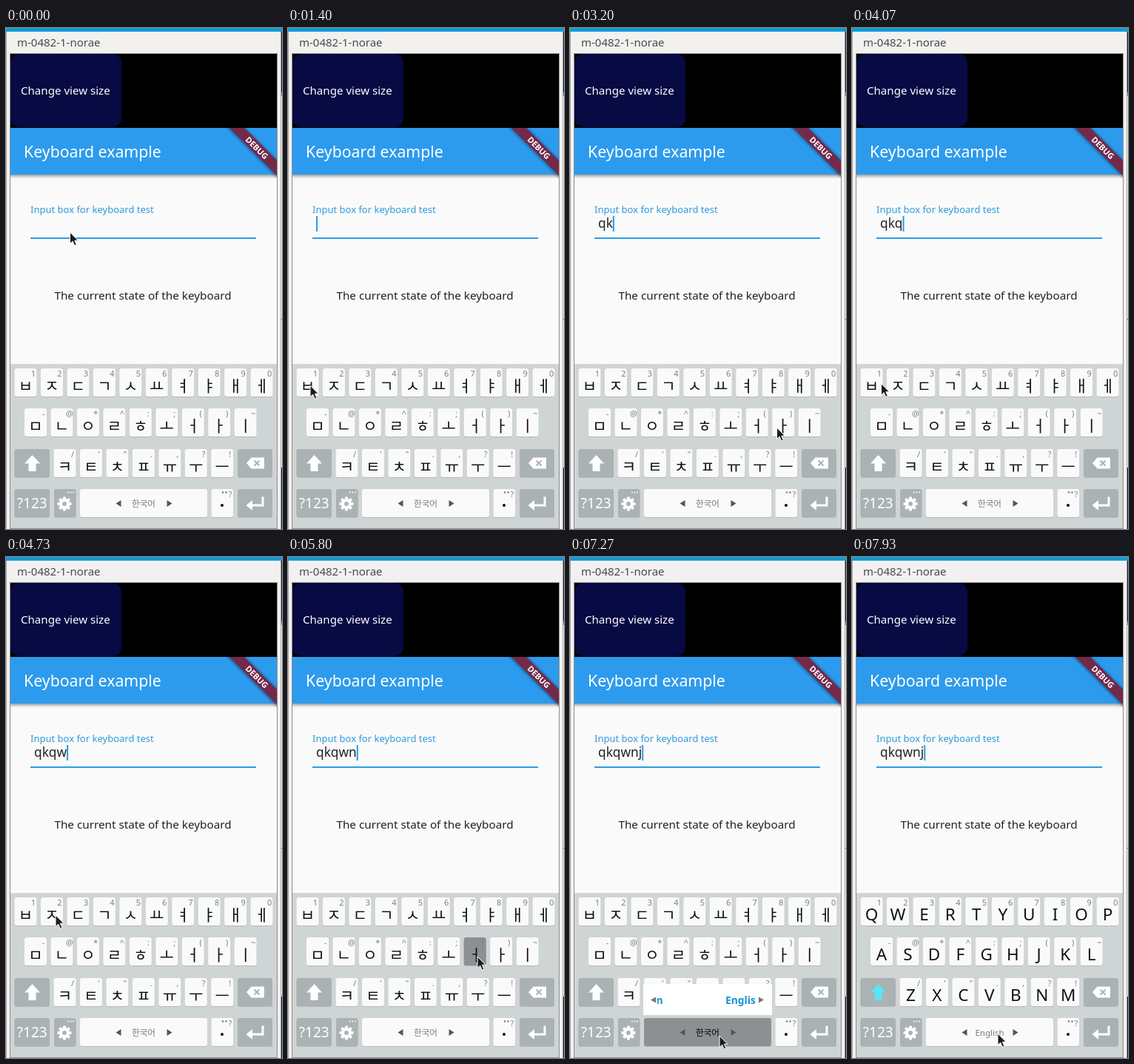
An HTML page for the animation above (8 s loop, 373 by 677 pixels).

```html
<!DOCTYPE html>
<html lang="en">
<head>
<meta charset="utf-8">
<title>Keyboard example</title>
<style>
html, body { margin: 0; width: 100%; height: 100%; overflow: hidden; background: #f2f1f0; }
svg { display: block; width: 373px; height: 677px; font-family: "Noto Sans", "Open Sans", sans-serif; }
.ko { font-family: "Noto Sans CJK KR", "Noto Sans CJK", "Noto Sans", sans-serif; font-weight: 500; }
.mid { text-anchor: middle; }
.hint { font-size: 11px; fill: #7c7f80; text-anchor: middle; }
</style>
</head>
<body>
<svg id="stage" viewBox="0 0 373 677">
  <defs>
    <filter id="soft" x="-20%" y="-60%" width="140%" height="220%"><feGaussianBlur stdDeviation="2"/></filter>
    <clipPath id="screen"><rect x="6" y="35" width="360" height="641"/></clipPath>
    <clipPath id="slot"><rect x="118" y="578" width="134" height="40"/></clipPath>
  </defs>
  <rect width="373" height="677" fill="#f2f1f0"/>
  <rect width="373" height="5" fill="#129dd3"/>
  <rect y="5" width="1" height="672" fill="#a9a9a9"/>
  <rect x="371" y="5" width="1" height="672" fill="#a9a9a9"/>
  <rect x="372" y="5" width="1" height="82" fill="#20203f"/>
  <rect x="372" y="87" width="1" height="5" fill="#24b5c9"/>
  <rect x="372" y="393" width="1" height="1" fill="#555"/>
  <rect x="372" y="594" width="1" height="83" fill="#15153d"/>
  <text x="15" y="25" font-size="15" fill="#4b4b4b">m-0482-1-norae</text>
  <rect x="5" y="34" width="362" height="643" fill="#8d8d8d"/>

  <g clip-path="url(#screen)">
    <rect x="6" y="35" width="360" height="641" fill="#fafafa"/>
    <rect x="6" y="35" width="360" height="100" fill="#000"/>
    <rect x="6" y="35" width="150" height="99" rx="12" fill="#070a43"/>
    <text x="20" y="90" font-size="15.1" fill="#fff">Change view size</text>
    <rect x="2" y="140" width="368" height="60" fill="#000" opacity=".45" filter="url(#soft)"/>
    <rect x="6" y="135" width="360" height="63" fill="#2d9bed"/>
    <text x="24" y="175" font-size="21.3" fill="#fff">Keyboard example</text>
    <svg x="6" y="135" width="360" height="68" viewBox="6 135 360 68">
      <g transform="translate(339 162) rotate(45)">
        <rect x="-60" y="-7" width="120" height="15" fill="#000" opacity=".55" filter="url(#soft)"/>
        <rect x="-60" y="-7" width="120" height="14" fill="#74294b"/>
        <text class="mid" y="4" font-size="11" font-weight="800" fill="#fff">DEBUG</text>
      </g>
    </svg>
    <text x="33" y="249.5" font-size="13" fill="#2d9bdc">Input box for keyboard test</text>
    <rect x="33" y="283" width="305" height="2" fill="#2d9be6"/>
    <text id="typed" x="38" y="270" font-size="17.3" fill="#222"></text>
    <rect id="caret" y="254" width="2" height="21" fill="#2d9be6"/>
    <text class="mid" x="185" y="367" font-size="15.25" fill="#212121">The current state of the keyboard</text>

    <rect x="6" y="454" width="360" height="222" fill="#cfd4d5"/>
    <g id="keys"></g>
    <g id="preview">
      <rect width="44" height="58" rx="3" fill="#fff" stroke="#b9bfc1"/>
      <text class="ko mid" x="22" y="39" font-size="26" fill="#1a94d4"></text>
    </g>
    <g id="picker" font-size="13.9" font-weight="700" fill="#1a94d4">
      <rect x="99" y="577" width="174" height="42" fill="#fff"/>
      <g clip-path="url(#slot)">
        <text id="prev" class="mid" y="604"></text>
        <text id="next" class="mid" y="604">English</text>
      </g>
      <path d="M109 598.5l7-4v8zM262 598.5l-7-4v8z" fill="#777"/>
    </g>
  </g>
  <path id="mouse" d="M0 0V15.5L3.6 12.2L6.2 18L8.8 16.8L6.3 11.2H11Z" fill="#1c1c1c" stroke="#fff" stroke-width="1"/>
</svg>
<script>
const NS = "http://www.w3.org/2000/svg";
const $ = id => document.getElementById(id);
const TICK = 1000 / 15, LOOP = 8000;

function add(parent, tag, attrs, text) {
  const el = document.createElementNS(NS, tag);
  for (const k in attrs) el.setAttribute(k, attrs[k]);
  if (text) el.textContent = text;
  parent.append(el);
  return el;
}

// Keyboard
const PALE = "#fafafa", GREY = "#abb2b3", DARK = "#8d9092";
const board = $("keys");
const keys = {}, labels = [];

function cap(x, y, w, fill) {
  add(board, "rect", { x, y: y + 1, width: w, height: 38, rx: 3, fill: "#b4babb" });
  return add(board, "rect", { x, y, width: w, height: 38, rx: 3, fill });
}

const rows = [
  { x: 11.5, y: 460, ko: "ㅂㅈㄷㄱㅅㅛㅕㅑㅐㅔ", en: "QWERTYUIOP", hint: "1234567890" },
  { x: 25, y: 514, ko: "ㅁㄴㅇㄹㅎㅗㅓㅏㅣ", en: "ASDFGHJKL", hint: "-@*^:;()~" },
  { x: 64.5, y: 569, ko: "ㅋㅌㅊㅍㅠㅜㅡ", en: "ZXCVBNM", hint: "/'\".,?!" }
];
for (const { x: x0, y, ko, en, hint } of rows) {
  [...ko].forEach((ch, i) => {
    const x = x0 + i * 35.45, cx = x + 15;
    keys[ch] = { cap: cap(x, y, 30, PALE), cx, y };
    add(board, "text", { x: x + 25.5, y: y + 11, class: "hint" }, hint[i]);
    labels.push({
      ko: add(board, "text", { x: cx, y: y + 30.5, class: "ko mid", "font-size": 21, fill: "#111" }, ch),
      en: add(board, "text", { x: cx, y: y + 31, class: "mid", "font-size": 22.5, fill: "#111" }, en[i])
    });
  });
}

cap(11.5, 569, 47.5, GREY);
const shift = add(board, "path", { d: "M35.5 577L46 588.5H40.5V599H30.5V588.5H25Z" });
cap(313, 569, 47, GREY);
add(board, "path", { d: "M325 588L331.5 580.5H349V595.5H331.5Z", fill: "#fff" });
add(board, "path", { d: "M335.5 584.5l7 7m0-7l-7 7", stroke: GREY, "stroke-width": 2 });

cap(11.5, 623, 47.5, GREY);
add(board, "text", { x: 35.2, y: 649, class: "mid", "font-size": 19, fill: "#fff" }, "?123");
cap(65, 623, 29.5, GREY);
for (let a = 0; a < 360; a += 45)
  add(board, "rect", { x: 77, y: 633.5, width: 4, height: 5, rx: 1, fill: "#fff", transform: `rotate(${a} 79 643)` });
add(board, "circle", { cx: 79, cy: 643, r: 4.9, fill: "none", stroke: "#fff", "stroke-width": 4 });
for (let i = 0; i < 3; i++) add(board, "circle", { cx: 84 + i * 3.6, cy: 627.5, r: 1, fill: "#fff" });

const space = cap(100, 623, 172, PALE);
add(board, "path", { d: "M148.5 642.5l7-4.5v9zM224.5 642.5l-7-4.5v9z", fill: "#555" });
const lang = {
  ko: add(board, "text", { x: 186, y: 646.5, class: "ko mid", "font-size": 11.6 }, "한국어"),
  en: add(board, "text", { x: 186, y: 647, class: "mid", "font-size": 11.5, fill: "#7b7b7b" }, "English")
};
labels.push(lang);

cap(277.5, 623, 29.5, PALE);
add(board, "circle", { cx: 292, cy: 645, r: 2, fill: "#111" });
add(board, "circle", { cx: 293, cy: 627.5, r: 1.2, fill: "#777" });
add(board, "circle", { cx: 297.5, cy: 627.5, r: 1.2, fill: "#777" });
add(board, "text", { x: 302.8, y: 634, class: "hint" }, "?");
cap(313, 623, 47, GREY);
add(board, "path", { d: "M347 633.5V645H329", fill: "none", stroke: "#fff", "stroke-width": 3 });
add(board, "path", { d: "M324.5 645L333 638V652Z", fill: "#fff" });

// Timeline, in ticks of 1/15 s
const path = [ // tick, x, y
  [0, 86.5, 276], [1, 86.5, 276], [2, 226, 276], [3, 226, 276], [8, 130, 400], [14, 36, 527],
  [16, 36, 527], [21, 30, 483], [32, 30, 483], [41, 287, 539], [42, 279.5, 540], [49, 279.5, 540],
  [50, 40, 500], [51, 40, 500], [53, 20, 479], [60, 20, 479], [62, 59, 482], [65, 59, 482],
  [68, 67, 484], [72, 67, 484], [74, 260, 591], [82, 260, 591], [83, 261, 558], [84, 261, 558],
  [86, 256, 540], [95, 256, 540], [104, 203, 652], [106, 203, 652], [108, 202, 647],
  [116, 202, 647], [119, 197, 644], [120, 197, 644]
];
const presses = [ // key, down, preview, up, letter
  ["ㅂ", 30, 32, 32, "q"], ["ㅏ", 45, 46, 48, "k"], ["ㅂ", 58, 59, 61, "q"],
  ["ㅈ", 67, 68, 69, "w"], ["ㅜ", 80, 81, 83, "n"], ["ㅓ", 87, 88, 90, "j"]
];
const caretOn = [[5, 13], [21, 30], [32, 39], [48, 55], [61, 77], [83, 97], [104, 111], [118, 120]];
const SPACE_DOWN = 106, SWITCH = 111;

const show = (el, on) => el.setAttribute("visibility", on ? "inherit" : "hidden");

function mouseAt(n) {
  const i = path.findIndex(p => p[0] > n);
  const [t0, x0, y0] = path[i - 1], [t1, x1, y1] = path[i];
  const k = (n - t0) / (t1 - t0);
  return [x0 + (x1 - x0) * k, y0 + (y1 - y0) * k];
}

function draw(n) {
  $("mouse").setAttribute("transform", `translate(${mouseAt(n)})`);

  const text = presses.filter(p => n >= p[3]).map(p => p[4]).join("");
  $("typed").textContent = text;
  $("caret").setAttribute("x", 38 + (text ? $("typed").getComputedTextLength() : 0));
  show($("caret"), caretOn.some(([a, b]) => n >= a && n < b));

  const held = presses.find(p => n >= p[1] && n < p[3]);
  for (const ch in keys) keys[ch].cap.setAttribute("fill", held && held[0] === ch ? DARK : PALE);
  const pop = held && n >= held[2];
  show($("preview"), pop);
  if (pop) {
    const { cx, y } = keys[held[0]];
    $("preview").setAttribute("transform", `translate(${Math.max(6, cx - 22)} ${y - 63})`);
    $("preview").lastElementChild.textContent = held[0];
  }

  const english = n >= SWITCH, down = n >= SPACE_DOWN && !english;
  for (const l of labels) { show(l.ko, !english); show(l.en, english); }
  shift.setAttribute("fill", english ? "#5be4f5" : "#fff");
  space.setAttribute("fill", down ? DARK : PALE);
  lang.ko.setAttribute("fill", down ? "#000" : "#7b7b7b");

  show($("picker"), down && n > SPACE_DOWN);
  const shiftX = Math.max(0, 110 - n) * 49;
  $("next").setAttribute("x", 186 + shiftX);
  $("prev").setAttribute("x", n < 109 ? 88 + shiftX : 121);
  $("prev").textContent = n < 109 ? "한국어" : n < 110 ? "n" : "";
}

let last = -1;
function frame() {
  const n = Math.floor((performance.now() % LOOP + 4) / TICK) % 120;
  if (n !== last) draw(last = n);
  requestAnimationFrame(frame);
}
frame();
</script>
</body>
</html>
```
